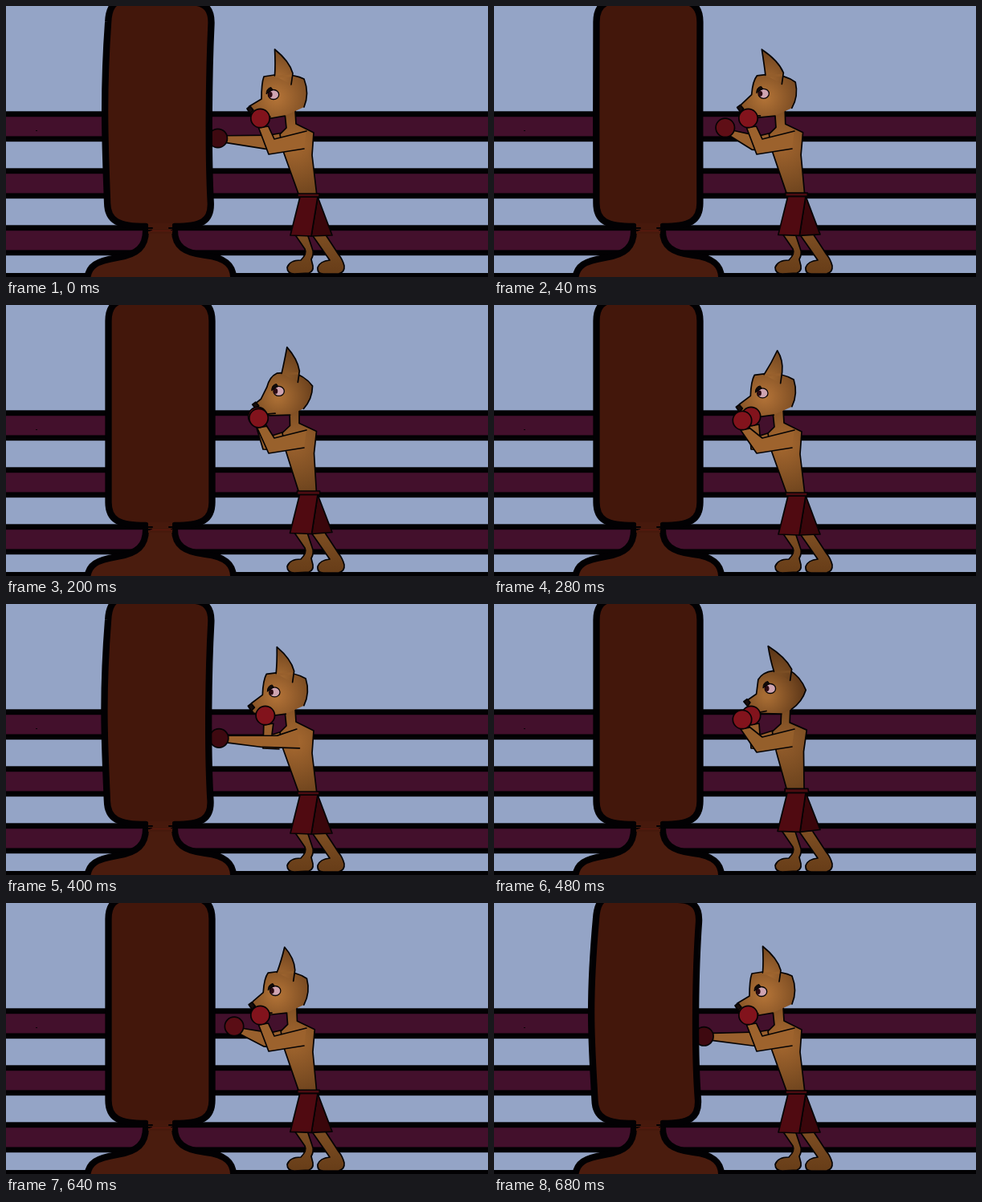
These frames come from a looping animation (600x338 px, 0.72 s). An HTML page with a canvas:

```html
<!DOCTYPE html>
<html lang="en">
<head>
<meta charset="utf-8">
<title>Boxing practice</title>
<style>
  html, body { margin: 0; width: 100%; height: 100%; overflow: hidden; background: #94a4c6; }
  canvas { display: block; width: 600px; height: 338px; }
</style>
</head>
<body>
<canvas id="stage" width="600" height="338"></canvas>
<script>
const ctx = document.getElementById('stage').getContext('2d');
const LOOP = 720, STEP = 40, INK = '#050304', BLACK = '#020103';

const lerp = (a, b, k) => a + (b - a) * k;
const smooth = k => k <= 0 ? 0 : k >= 1 ? 1 : k * k * (3 - 2 * k);

// Rises from a to b, holds until c, falls back by d; may run past the loop end.
function pulse(t, a, b, c, d) {
  if (t < a) t += LOOP;
  return t < b ? smooth((t - a) / (b - a)) : smooth((d - t) / (d - c));
}

// Blend two path strings that share the same commands.
function mix(a, b, k) {
  const to = b.match(/-?[\d.]+/g);
  let i = 0;
  return a.replace(/-?[\d.]+/g, n => lerp(+n, +to[i++], k).toFixed(2));
}

function shape(d, fill, line = INK, width = 1.7) {
  const p = new Path2D(d);
  if (fill) { ctx.fillStyle = fill; ctx.fill(p); }
  if (line) { ctx.strokeStyle = line; ctx.lineWidth = width; ctx.stroke(p); }
}

function oval(x, y, rx, ry, fill, width = 1.7) {
  ctx.beginPath();
  ctx.ellipse(x, y, rx, ry, 0, 0, 7);
  ctx.fillStyle = fill;
  ctx.fill();
  if (width) { ctx.strokeStyle = INK; ctx.lineWidth = width; ctx.stroke(); }
}

function rect(x, y, w, h, fill) {
  ctx.fillStyle = fill;
  ctx.fillRect(x, y, w, h);
}

const rgb = (a, b, k) => `rgb(${a.map((n, i) => Math.round(lerp(n, b[i], k)))})`;

function glow(x, y, r, inner, outer) {
  const g = ctx.createRadialGradient(x, y, 4, x, y, r);
  g.addColorStop(0, inner);
  g.addColorStop(1, outer);
  return g;
}

// One near-hand punch landing at 360 ms, one far-hand punch landing at 680 ms.
function pose(t) {
  const leanNear = pulse(t, 120, 280, 400, 500);
  const leanFar = pulse(t, 560, 670, 725, 840);
  const ready = pulse(t, 160, 280, 480, 560);
  const hitNear = pulse(t, 280, 360, 385, 480);
  const hitFar = pulse(t, 590, 685, 705, 810);
  return {
    lean: Math.max(leanNear, leanFar),
    head: Math.max(leanNear * .89, leanFar),
    ear: 16 * pulse(t, 160, 275, 285, 415) + 9 * pulse(t, 570, 625, 635, 680)
       - 11 * pulse(t, 400, 470, 490, 560) - 9 * pulse(t, 720, 790, 800, 840),
    near: [lerp(316.5 - 7.5 * ready, 262, hitNear), lerp(140 + 4 * ready, 169, hitNear), hitNear],
    far: [lerp(311 + 9 * ready + 3 * hitNear, 261, hitFar), lerp(139, 166.5, hitFar), hitFar],
    push: Math.max(pulse(t, 335, 360, 375, 460), pulse(t, 650, 680, 690, 770))
  };
}

function ring() {
  rect(0, 0, 600, 338, '#94a4c6');
  for (let y = 131.3; y < 300; y += 71) {
    rect(0, y, 600, 37.9, BLACK);
    rect(0, y + 6.9, 600, 24.2, '#43102c');
  }
  rect(0, 333, 600, 5, BLACK);
  rect(37, 155, 2, 1, BLACK);
}

function bag(k) {
  shape('M101 342C102 323 114 318 138 314C164 310 174 300 174 280L210 280C210 300 222 308 248 311C274 314 284 324 283 342Z',
        '#4a1c0e', BLACK, 8);
  shape(mix(
    'M174 275C140 275 127.500 268 127.500 246C127.500 180 127.500 80 127.500 20C127.500 3 135 -6 150 -6L234 -6C249 -6 256.500 3 256.500 20C256.500 80 256.500 180 256.500 246C256.500 268 244 275 210 275',
    'M174 275C140 275 126 268 125.500 246C122 180 117 130 127 20C128 4 132 -7 146 -8L232 -4C249 -3 256 6 255 24C251 80 249 180 254 246C255 268 244 275 210 275', k),
    '#43170b', BLACK, 8.3);
  rect(177, 271, 30, 13, '#47190c');
  shape('M172 277L182 277M203 277L212 277M176 280L181 280M206 280L211 280', null, BLACK, 2);
  shape('M180 280.500L207 280.500', null, '#641810', .8);
}

// Bent arm: shoulder, elbow and wrist edges follow the glove.
function arm(guard, reach, [x, y, e], fill) {
  const [a, b, c, d] = mix(guard, reach, e).split(' ');
  const top = `${x + 10},${y + lerp(10, -4, e)}`;
  const low = `${x + lerp(-2, 10, e)},${y + lerp(12, 5, e)}`;
  shape(`M${a}L${b}L${top}L${low}L${c}L${d}`, fill);
}

const glove = ([x, y, e]) =>
  oval(x, y, 11.7, 11.7, rgb([130, 19, 28], [62, 9, 16], Math.min(1, e * 1.1)));

function legs() {
  const fur = ctx.createLinearGradient(0, 286, 0, 334);
  fur.addColorStop(0, '#7c4d22');
  fur.addColorStop(1, '#673d18');
  shape('M380 284L403 317Q391 318 388 326Q387 335 397 334L414 334Q422 332 421 324Q419 316 414 310L397 284', fur);
  shape('M359 284L372 303Q375 309 367 317Q353 317 350 326Q350 334 359 334L377 333Q383 331 382 324L380 316Q384 309 381 302L375 284', fur);
}

function torso(k) {
  shape(mix(
    'M359 133L358 149L347 159L352 184L365 233L386 233L386 184L390 157L369 148L370 128',
    'M347 133L349 152L341 160L345 181L365 237L387 237L381 186L383 158L361 147L360 130', k),
    glow(358, 172, 66, rgb([144, 91, 42], [164, 103, 47], k), rgb([104, 64, 28], [112, 69, 30], k)));
}

function shorts(k) {
  shape(mix('M388 235L406 281L381 284Z', 'M388 238L406 286L380 287Z', k), '#3a060b');
  shape(mix('M365 235L388 235L381 284L353 283Z', 'M366 238L388 238L380 287L354 286Z', k), '#500a11');
  shape(mix('M362 230L391 230L392 235L362 235Z', 'M363 234L390 234L390 238L363 238Z', k), '#4c0c11');
}

function head(k, sway) {
  const light = rgb([166, 108, 51], [176, 113, 54], k);
  const dark = rgb([82, 47, 20], [112, 68, 30], k);
  shape(mix(
    'M359 137L327 136L318 128L314 121L329 111L330 92Q336 84 350 83L371 82Q384 91 390 109Q384 124 370 132',
    'M347 137L330 140L307 137L301 129L303 125L318 116L318 96Q321 88 334 86L357 84Q371 91 378 109Q371 126 359 134', k),
    glow(lerp(340, 336, k), 114, 52, light, dark));
  const x = lerp(354, 334.5, k) + sway, y = lerp(50, 54, k) + Math.abs(sway) * .2;
  const lx = lerp(350, 334.5, k), ly = lerp(84, 87, k);
  const rx = lerp(372, 357, k), ry = lerp(81, 84, k);
  shape(`M${lx} ${ly}Q${lx + 1 + sway * .5} ${ly - 14} ${x} ${y}Q${rx - 4 + sway * .35} ${ry - 15} ${rx} ${ry}L${rx - 2} ${ry + 14}`,
        glow(lx + 4, ly + 5, 40, rgb([118, 74, 33], [164, 105, 50], k), dark));
  // Cover the seam between ear and skull.
  shape(`M${lx + 2} ${ly + 1}L${rx - 3} ${ry + 3}`, null, rgb([120, 76, 35], [156, 99, 46], k), 3);
  shape(mix('M327 136L340 133', 'M314 137L329 138', k));
  const ex = lerp(345, 333, k), ey = lerp(105, 110.5, k);
  oval(ex, ey, 6.7, 6, '#cfa4b1', 1.3);
  oval(ex - 4, ey, 2.6, 3.4, '#2c0a12', 0);
  shape(`M${ex - 9} ${ey - 1}Q${ex - 9} ${ey - 8} ${ex - 3} ${ey - 9}L${ex - 1} ${ey - 6}L${ex - 6} ${ey - 3}Z`, '#120a08', INK, 1);
  shape(mix('M312 121L316 118L320 122L317 127Z', 'M300 128L304 125L308 130L304 134Z', k), '#180d0b');
}

function draw(t) {
  const p = pose(t);
  ring();
  arm('347,158 331,163 320,180 340,181', '345,158 327,161 322,178 346,181', p.far, '#99602d');
  legs();
  torso(p.lean);
  shorts(p.lean);
  head(p.head, p.ear);
  glove(p.far);
  arm('374,156 334,166 327,185 371,178', '361,156 338,164 318,178 365,180', p.near,
      rgb([148, 94, 43], [158, 99, 45], p.lean));
  glove(p.near);
  bag(p.push);
}

ctx.lineJoin = ctx.lineCap = 'round';
function tick() {
  draw(Math.floor(performance.now() % LOOP / STEP) * STEP);
  requestAnimationFrame(tick);
}
tick();
</script>
</body>
</html>
```
